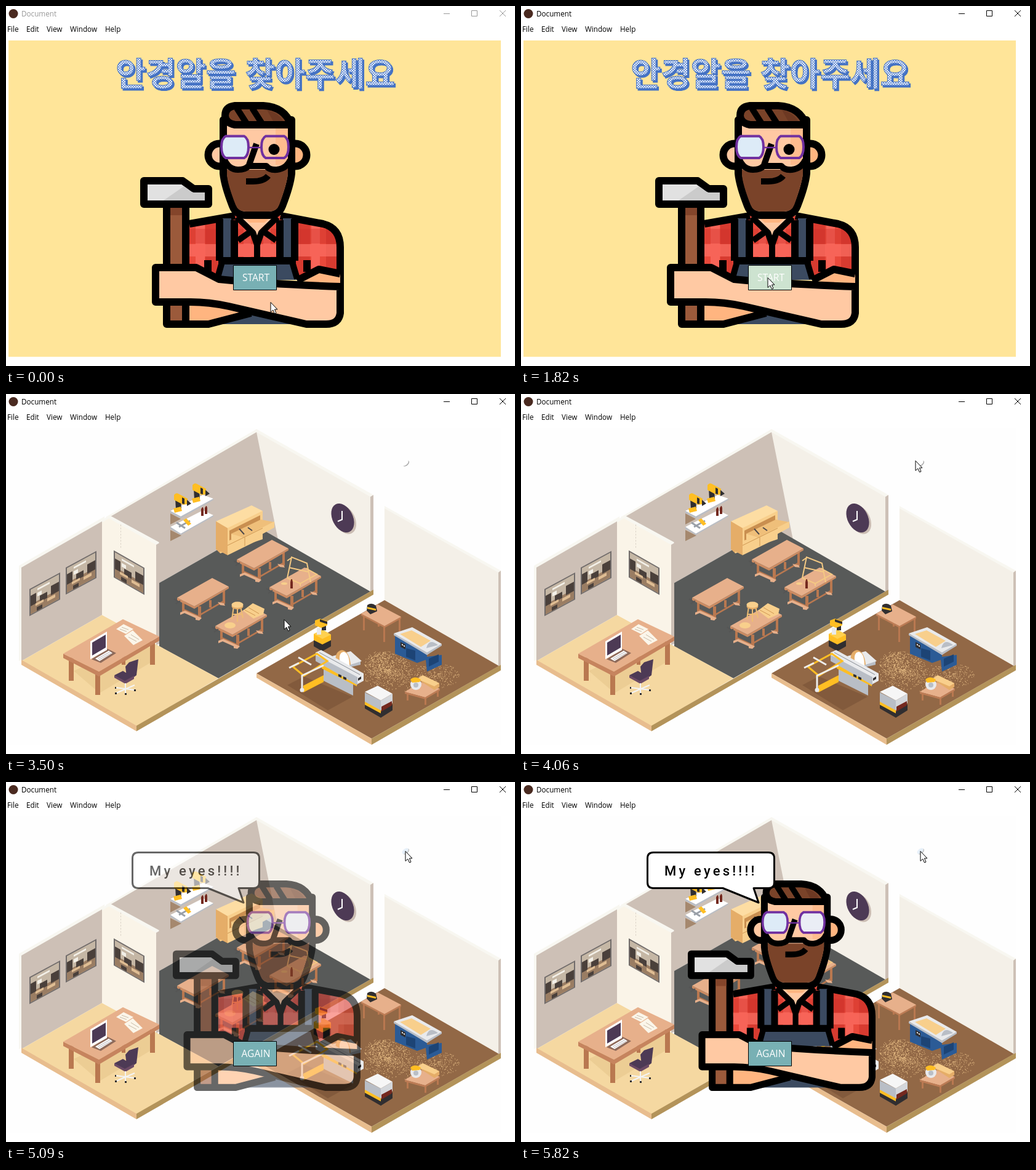
Recreate the animation shown at these times as an HTML page. Size 827 by 585 pixels, loop 5890 ms.

```html
<!DOCTYPE html>
<html lang="ko">
<head>
<meta charset="utf-8">
<title>Document</title>
<style>
html, body { margin: 0; width: 100%; height: 100%; overflow: hidden; background: #fff }
svg { display: block; width: 827px; height: 585px }
.ui { font: 11.7px "Open Sans", "Noto Sans", sans-serif }
.title { font: bold 53px "Noto Sans CJK KR", "Noto Sans CJK", "Noto Sans CJK JP", sans-serif }
.label { font: 15.6px "Open Sans", "Noto Sans", sans-serif; fill: #fff; text-anchor: middle }
.shout { font: 500 22px Roboto, sans-serif; letter-spacing: 4.2px }
.line { fill: none; stroke: #000; stroke-width: 12; stroke-linejoin: round }
.mid { stroke-width: 10 }
.thin { fill: none; stroke-width: 2 } .hairline { stroke-width: 1 } .bar { stroke-width: 3 }
.shade { fill: #cdc0b6 } .wall { fill: #f4f0e8 } .rim { fill: #f8f7f1 }
.lip { fill: #e8bd8e } .gold { fill: #b3935a }
.top { fill: #e7b08b } .leg { fill: #b97850 } .pine { fill: #f8cf8c } .oak { fill: #e5ad68 }
.yel { fill: #ffbe23 } .dark { fill: #302e30 } .pale { fill: #e9eaec } .steel { fill: #b9bec6 }
.plum { fill: #4d3a55 } .blue { fill: #2b5b96 } .wine { fill: #74291f }
.navy { fill: #3b4a60 } .skin { fill: #ffc9a3 } .tan { fill: #ffb580 } .hair { fill: #7a4329 }
</style>
</head>
<body>
<svg viewBox="0 0 827 585">
<defs>
  <pattern id="dots" width="4" height="4" patternUnits="userSpaceOnUse">
    <rect width="4" height="4" fill="#e6edf8"/>
    <path d="M0 0h2v2h-2zM2 2h2v2h-2z" fill="#6f94d6"/>
  </pattern>
  <clipPath id="torso"><path d="M298 354L372 341H446L515 354Q542 361 543 392V440H298Z"/></clipPath>

  <path id="lens" d="M357 211.500H387Q394 215 394 229Q394 243 387 247H357Q350 243 350 229Q350 215 357 211.500Z"/>
  <g id="specs" fill="none" stroke="#7030a0" stroke-width="4">
    <use href="#lens"/><use href="#lens" x="65"/>
    <path d="M394 230H415" stroke-width="2.500"/>
  </g>

  <g id="man">
    <path class="navy" d="M345 517L396 500L466 517Z"/>
    <g clip-path="url(#torso)">
      <path fill="#e9493b" d="M290 335H550V445H290Z"/>
      <path fill="#d83b30" d="M324 335h20v110h-20zM470 335h24v110h-24zM520 335h24v110h-24z"/>
      <path fill="#ff7468" opacity=".65" d="M308 335h15v110h-15zM386 335h12v110h-12zM418 335h12v110h-12zM496 335h14v110h-14zM290 387h260v20h-260z"/>
      <path fill="#c9302a" opacity=".35" d="M290 362h260v24h-260z"/>
    </g>
    <path class="skin" d="M380 342H436L414 362L408 380L400 362Z"/>
    <path class="tan" d="M384 341H432L420 352H396Z"/>
    <path class="line" d="M298 354L372 341M446 341L515 354Q543 361 543 392V460"/>
    <path class="line mid" d="M375 343L401 368L408 388L415 368L441 343M377 381L401 364M439 381L415 364M408 382V414"/>
    <path class="navy" d="M352 345h14v72h-14zM450 345h14v72h-14zM352 418H464L473 445H343Z"/>
    <path class="line" d="M347 346V414M371 348V414M445 348V414M469 346V414M328 413V432M489 413V432M345 414H471"/>
    <path class="line mid" d="M351 416L344 441M465 416L473 443"/>

    <g class="line">
      <circle class="skin" cx="347" cy="242" r="18.500"/><circle class="tan" cx="470" cy="242" r="18.500"/>
      <path class="skin" d="M353 185V272Q355 292 368 325Q374 340 389 340H428Q443 340 449 325Q462 292 464 272V185Z"/>
    </g>
    <path class="tan" opacity=".6" d="M438 195H458V258H438Z"/>
    <path class="hair" d="M359 265Q371 274 389 266H427Q445 274 458 262V274Q456 290 444 323Q440 334 428 334H389Q377 334 373 323Q360 290 359 274Z"/>
    <path class="line mid" d="M355 250Q362 266 377 266Q389 266 394 260H423Q428 267 440 266Q456 264 462 250"/>
    <path class="line mid" d="M390 285H401Q419 285 426 276"/>
    <path class="line mid" d="M407 224L395 258"/>
    <circle cx="435.500" cy="233" r="9"/>
    <path class="line" style="fill:#7a4329" d="M372 162H418Q453 164 463 193H372Q356 190 356 178Q356 164 372 162Z"/>
    <path class="line mid" d="M375 166L391 191M400 166L416 191"/>
    <path fill="#64341f" opacity=".6" d="M424 169Q442 173 450 187H434Z"/>
    <use href="#lens" fill="#ddebf7"/>

    <path class="tan" d="M292 480L350 487L395 501L330 517H292ZM478 446L508 430L543 436V457Z"/>
    <path class="line" d="M261 517H329L398 499M473 446L508 428L543 435"/>
    <path class="line" style="fill:#9b5a3b" d="M261 320H292V517H261Z"/>
    <path fill="#84452b" d="M267 327h19v13h-19z"/>
    <path class="line" style="fill:#e1e1e1" d="M224 284H287L305 297H329V322H224Z"/>
    <path fill="#cbcbcb" d="M256 316L289 293L303 303H323V316Z"/>
    <path class="line" style="fill:#ffc9a3" d="M243 425H309L346 444Q430 452 543 456V499Q541 517 520 517H488L362 488Q330 481 300 481H243Z"/>
  </g>

  <g id="bench">
    <path class="leg" d="M8 3h4v21h-4zM34 14h5v20h-5zM52 4h4v12h-4zM74 -11h4v21h-4zM9 17L37 30V33L9 20ZM38 26L76 4V7L38 29Z"/>
    <path class="top" d="M5 24L13 21L40 33L36 37L30 36V33L12 25L5 28ZM66 7L76 9L78 13L70 12Z"/>
    <path fill="#cb8b62" d="M0 0L28 14L84 -18V-15L28 18L0 4Z"/>
    <path class="top" d="M0 0L57 -32L84 -18L28 14Z"/>
    <path class="thin" stroke="#555" d="M-5 2L4 8M-2 10L5 5"/>
  </g>
  <g id="photo">
    <path fill="#716c6b" d="M0 0h50v44h-50z"/><path fill="#c5b7a5" d="M2 2h46v40h-46z"/>
    <path fill="#9a7d63" d="M2 26h46v16h-46z"/><path fill="#4a403b" d="M2 12h9v17h-9zM17 20h12v10h-12zM35 14h13v15h-13zM12 36h9v6h-9z"/>
    <path fill="#dfbd93" d="M10 29h13v4h-13zM29 31h13v5h-13z"/><path fill="#f3f0e8" d="M13 6h20v3h-20zM13 13h7v6h-7z"/>
  </g>
  <g id="drill">
    <path class="dark" d="M2 9L11 13L12 25L3 26Z"/><path class="yel" d="M0 3Q3 -1 7 1L22 9V18L15 19L0 11ZM-1 25L11 22L13 29L1 32Z"/>
    <path class="dark" d="M13 7L17 9V18L13 17ZM21 11L28 17L21 21Z"/>
  </g>
</defs>

<g class="ui" id="bar">
  <circle cx="12" cy="12.500" r="7.500" fill="#4a2a20"/>
  <text x="25" y="17" fill="currentColor">Document</text>
  <path stroke="currentColor" fill="none" d="M711 12.500h10M756.500 7.500h9v9h-9zM802 7l10 10M812 7l-10 10"/>
</g>
<g class="ui"><text x="2" y="42">File</text><text x="33" y="42">Edit</text><text x="66" y="42">View</text><text x="104" y="42">Window</text><text x="161" y="42">Help</text></g>

<g id="intro">
  <path fill="#ffe599" d="M4 56h800v514h-800z"/>
  <g class="title">
    <text x="181" y="132.500" fill="#4472c4" stroke="#4472c4">안경알을 찾아주세요</text>
    <text x="178.500" y="130" fill="url(#dots)" stroke="#4472c4">안경알을 찾아주세요</text>
  </g>
  <use href="#man"/><use href="#specs"/>
</g>

<g id="room">
  <path fill="#fefefe" d="M4 56h800v514h-800z"/>
  <!-- main hall and office -->
  <path class="rim" d="M162 200L407 57L597 164L592 168L407 63L170 202ZM21 279L160 199V208L25 284V432L21 434Z"/>
  <path class="wall" d="M407 62L592 167V322L409 216Z"/>
  <path class="shade" d="M170 199L407 62L442 237L409 216L249 307V242ZM592 167L597 164V320L592 322Z"/>
  <path class="shade" d="M25 282L156 207V359L25 434Z"/>
  <path fill="#585a59" d="M249 307L409 216L592 321L345 462L249 410Z"/>
  <path fill="#f5d8a1" d="M25 434L156 359L345 462L212 540Z"/>
  <path class="lip" d="M25 432L212 539V548L25 440Z"/>
  <path class="gold" d="M212 539L597 318V326L212 548Z"/>
  <path fill="#faf4e8" d="M156 207L167 200L246 245V408L156 359Z"/>
  <path class="rim" d="M156 205L168 197L249 241L244 245L167 202L156 209Z"/>
  <path class="shade" d="M244 245L249 242V406L244 408Z"/>
  <path stroke="#ddd5ca" stroke-dasharray="3 2" d="M186.500 212V252"/>
  <use href="#photo" transform="matrix(1 -.54 0 1 38 317)"/>
  <use href="#photo" transform="matrix(1 -.54 0 1 97 282)"/>
  <use href="#photo" transform="matrix(1 .57 0 1 175 254)"/>

  <!-- shelves -->
  <path fill="#a5886e" d="M267 194L284 203L267 212ZM267 221L285 230L267 239Z"/>
  <path fill="#fff" d="M267 190L320 164L337 170L284 199ZM267 216L320 189L337 197L284 227Z"/>
  <path class="steel" d="M267 190L284 199L337 170V172L284 202L267 193ZM267 216L284 227L337 197V199L284 229L267 219Z"/>
  <use href="#drill" x="273" y="161"/><use href="#drill" x="303" y="145"/>
  <path class="wine" d="M317 187l2-3h1l1 3v11h-4zM323 185l2-3h1l1 3v10h-4z"/>
  <path class="thin bar" stroke="#9aa0a8" d="M277 209L291 218M281 216L299 206"/>
  <path class="yel" d="M288 205L293 202L301 211L296 214Z"/>

  <!-- clock -->
  <ellipse cx="550.500" cy="204" rx="16.500" ry="25" transform="rotate(-27 550.500 204)" fill="#cbbdb3"/>
  <ellipse class="plum" cx="547" cy="201.500" rx="16.500" ry="25" transform="rotate(-27 547 201.500)"/>
  <path class="thin" stroke="#fff" d="M546 190V204L539 207"/>

  <!-- cabinet -->
  <path class="oak" d="M341 207L348 211V259L341 252Z"/>
  <path class="pine" d="M348 211L417 190V236L348 259Z"/>
  <path fill="#fddda3" d="M341 207L399 181L417 190L360 218Z"/>
  <path class="oak" d="M341 207L360 218V262L341 252Z"/>
  <path class="pine" d="M360 218L417 190V234L360 262Z"/>
  <path fill="#c98f50" d="M363 222L413 197V214L363 238Z"/>
  <path fill="#efbf7a" d="M366 227L414 204L435 208L385 235Z"/>
  <path class="pine" d="M385 233L436 207V217L388 243L366 236V227Z"/>
  <path class="thin hairline" stroke="#cf9752" d="M360 246L417 218M388 233V247"/>
  <path class="thin" stroke="#4f4a4a" d="M379 219L387 228M393 217L400 222"/>

  <use href="#bench" x="375" y="269"/><use href="#bench" x="428" y="314"/>
  <use href="#bench" x="278" y="331"/><use href="#bench" x="340" y="377"/>
  <path class="thin" stroke="#f4c983" d="M457 299L464 265L489 275L495 306M460 282L491 289M457 299L478 308L505 293L487 283M478 308V312M464 266L457 271"/>
  <path class="wine" d="M462 316V306L463 301H465L466 306V316Z"/>
  <ellipse cx="452" cy="308" rx="5" ry="2" class="pine"/>
  <path class="thin" stroke="#efbd74" d="M370 345L367 366M381 345L385 364M376 347V370M369 358H384"/>
  <ellipse class="oak" cx="376" cy="345" rx="9.500" ry="5"/><ellipse class="pine" cx="376" cy="342.500" rx="9.500" ry="5"/>
  <ellipse class="pine" cx="364" cy="376" rx="9" ry="5"/>
  <path class="pine" d="M385 352L401 340L420 349L418 358L402 365Z"/><path class="thin hairline" stroke="#cf9752" d="M388 351L405 360M394 347L411 357"/>

  <!-- office desk -->
  <path fill="#d9b77d" d="M110 450L175 420L234 412V437L152 486Z" opacity=".35"/>
  <path class="leg" d="M102 428h8v38h-8zM145 451h8v38h-8zM234 402h8v38h-8zM188 420h6v20h-6z"/>
  <path fill="#c6845e" d="M93 422L151 451L249 394V401L151 459L93 429Z"/>
  <path class="top" d="M93 422L190 366L249 394L151 451Z"/>
  <path fill="#fbf6ea" d="M179 382L191 374L207 382L195 390ZM192 393L206 384L222 400L207 408Z"/>
  <path class="thin hairline" stroke="#c9bba8" d="M185 382L196 386M188 379L199 383M199 395L212 402M203 391L216 399"/>
  <path fill="#8e6a5a" d="M139 431L165 414L179 421L154 437Z"/>
  <path fill="#fff" d="M137 402L164 386V416L137 431Z"/><path class="plum" d="M140 404L162 391V412L140 425Z"/>
  <path fill="#fff" d="M145 430L167 417L173 421L152 434Z"/><path class="thin hairline" stroke="#b5b1b5" d="M149 430L169 419M151 432L171 421"/>
  <path class="plum" d="M194 443L200 436L215 431L212 457L197 468ZM176 457L190 450L208 461L193 469Z"/>
  <path fill="#6b4a65" d="M176 457L193 466L208 458V463L194 471L176 461Z"/>
  <path class="thin" stroke="#f4f4f4" d="M194 470V478M178 477L209 481M179 486L209 473M194 477V487"/>
  <path class="dark" d="M177 485h3v3h-3zM193 486h3v3h-3zM208 480h3v3h-3zM177 476h2v3h-2z"/>

  <!-- machine shop -->
  <path class="rim" d="M615 182L804 287L800 291L615 187Z"/>
  <path class="wall" d="M615 186L800 290V443L615 336Z"/>
  <path class="shade" d="M800 290L804 287V440L800 442Z"/>
  <path fill="#926846" d="M615 335L801 442L594 560L407 454Z"/>
  <path class="lip" d="M407 454L594 560V570L407 461Z"/>
  <path class="gold" d="M594 560L804 440V449L594 570Z"/>
  <path fill="#795236" opacity=".6" d="M457 473L484 459L563 492L523 514Z"/>
  <path id="dust" stroke="#e9bf86" stroke-width="1"/>

  <path class="leg" d="M580 358h3v26h-3zM613 374h3v29h-3zM638 362h3v27h-3zM604 365h3v13h-3z"/>
  <path fill="#bd7c55" d="M577 357L615 377L642 362V365L615 380L577 360Z"/>
  <path class="top" d="M577 357L604 342L642 362L615 377Z"/>
  <path class="dark" d="M587 343Q594 338 601 344L603 353L592 358L586 352Z"/><path class="yel" d="M587 346L601 349V352L587 349Z"/>

  <path class="dark" d="M500 390L514 398L528 391V410L514 418L500 410Z"/>
  <path class="yel" d="M500 390L514 383L528 391V400L514 407L500 400Z"/><path fill="#ffd150" d="M500 390L514 383L528 391L514 398Z"/>
  <path class="pale" d="M505 380h7v11h-7z"/><path class="dark" d="M513 373h7v11h-7z"/>
  <path class="yel" d="M502 368L510 365L522 369V376L512 380L502 376Z"/><path class="dark" d="M510 366L522 370V374L510 370Z"/>

  <path class="steel" d="M534 425L576 433V440L545 447Z"/><path class="pale" d="M530 426L560 418L578 434L550 443Z"/>
  <path class="oak" d="M536 438Q533 418 546 416Q558 418 560 440Z"/><path fill="#fff" d="M543 438Q539 420 549 419Q558 421 558 442Z"/>
  <path class="yel" d="M483 474L516 457V468L483 485Z"/>
  <path class="steel" d="M516 443L564 469V490L516 466Z"/>
  <path class="yel" d="M513 438L570 467V475L513 446Z"/>
  <path class="pale" d="M503 420L512 416L581 454V466L570 472L503 431Z"/>
  <path class="steel" d="M503 424L571 460V473L503 434Z"/><path class="thin hairline" stroke="#868c94" d="M509 420L575 456"/>
  <path class="dark" d="M540 455l5 2v4l-5-2zM548 459l5 2v4l-5-2zM572 462l5-3v4l-5 3z"/>
  <path class="thin bar" stroke="#ffbe23" d="M466 443L505 422L522 434L484 458Z"/>
  <path class="thin bar" stroke="#eeeeec" d="M460 445L476 437M475 428L496 440M481 457V484M480 458L516 441"/>
  <circle class="pale" cx="481" cy="481" r="3.500"/>

  <path class="blue" d="M632 393L684 421V427L708 424V440L684 451L682 432L668 437L632 422Z"/>
  <path fill="#1d4475" d="M650 413L665 417V433L650 427ZM687 430L703 423V435L687 443Z"/>
  <path class="pale" d="M630 389L660 379L708 406L684 424Z"/><path class="steel" d="M630 389L684 420L708 406V409L684 424L630 392Z"/>
  <path class="pine" d="M640 390L659 384L690 401L674 411Z"/><path class="steel" d="M683 413Q687 396 702 408Z"/>
  <path class="dark" d="M641 403l8 4v8l-8-4z"/><path fill="#fff" d="M643 406l2 1v2l-2-1zM646 408l2 1v2l-2-1z"/>

  <path class="leg" d="M651 484h3v14h-3zM680 489h3v16h-3zM700 476h3v16h-3z"/>
  <path class="top" d="M648 484L674 468L705 479L681 493Z"/><path fill="#bd7c55" d="M648 484L681 493L705 479V482L681 496L648 487Z"/>
  <path class="oak" d="M668 463L677 457L704 470V476L696 481Z"/><path class="pine" d="M668 463L677 457L704 470L696 475Z"/>
  <circle class="pale" cx="666" cy="472" r="9"/><circle class="steel" cx="666" cy="473" r="4"/><path class="yel" d="M657 464Q664 457 674 464L672 468L660 469Z"/>

  <path class="dark" d="M583 501L609 516L628 504V514L609 526L583 511Z"/>
  <path class="steel" d="M583 485L609 498V515L583 501Z"/><path fill="#f6f6f6" d="M583 484L604 474L628 487L609 498Z"/>
  <path fill="#d4d7db" d="M609 498L628 487V502L609 514Z"/><path class="yel" d="M583 500L609 514V519L583 505Z"/>
  <path class="wine" d="M610 508L627 499V506L610 516Z"/>

  <g id="lost" transform="rotate(-40 649 112.500)"><ellipse cx="649.500" cy="113.500" rx="6" ry="3.500" fill="#aaa"/><ellipse id="glass" cx="649" cy="112" rx="6" ry="3.500"/></g>
  <g id="ending">
    <g transform="translate(271 160) scale(.9215 .932) translate(-218 -156)">
      <use href="#man"/><use href="#lens" x="65" fill="#eaedf5"/><use href="#specs"/>
    </g>
    <path fill="#fff" stroke="#000" stroke-width="3" stroke-linejoin="round" d="M215 114.500H402Q411.500 114.500 411.500 124V163Q411.500 172.500 402 172.500H378L386 196L328 172.500H215Q205.500 172.500 205.500 163V124Q205.500 114.500 215 114.500Z"/>
    <text class="shout" x="233" y="152">My eyes!!!!</text>
  </g>
</g>

<g id="button">
  <path id="face" stroke="#000" d="M369.500 421.500h70v40h-70z"/>
  <text id="word" class="label" x="406" y="447"></text>
</g>
<path id="cursor" fill="#fff" stroke="#000" d="M.5 .5V16.500L4.300 13L7 19L9.500 18L7 12H11.500Z"/>
</svg>

<script>
const LOOP = 5890;
const el = id => document.getElementById(id);
const show = (id, on) => el(id).style.display = on ? '' : 'none';
const mix = (a, b, p) => a + (b - a) * p;

// Share of a move done at time t, in n even jumps from a to b.
const jumps = (t, a, b, n) =>
  t < a ? 0 : Math.min(1, (Math.floor((t - a) / (b - a) * (n - 1) + .001) + 1) / n);

// Sawdust: seeded specks, densest in the middle of each heap.
let seed = 7;
const rnd = () => (seed = seed * 16807 % 2147483647) / 2147483647;
const heap = (x, y, rx, ry, n) => Array.from({length: n}, () => {
  const a = rnd() * 2 * Math.PI, r = rnd() ** .7;
  return `M${(x + rx * r * Math.cos(a)).toFixed(1)} ${(y + ry * r * Math.sin(a)).toFixed(1)}h1`;
}).join('');
el('dust').setAttribute('d', heap(618, 450, 40, 32, 560) + heap(606, 440, 24, 22, 240) +
  heap(702, 458, 36, 20, 220) + heap(660, 462, 42, 22, 160) + heap(612, 364, 14, 8, 40));

// start, end, jumps, x, y
const moves = [
  [660, 1210, 9, 386, 429],
  [1700, 1820, 2, 401, 441],
  [3390, 3920, 9, 632, 103],
  [3990, 4200, 4, 649, 112]
];
const fadeTimes = [4830, 4960, 5090, 5290, 5430, 5560, 5690, 5820];

function draw(t) {
  const room = t >= 2730, again = t >= 4830;
  el('bar').style.color = t < 1270 ? '#999' : '#000';
  show('intro', !room);
  show('room', room);
  show('button', !room || again);
  el('word').textContent = again ? 'AGAIN' : 'START';

  const hover = again ? 0 : jumps(t, 900, 1470, 9);
  const from = [120, 176, 180], to = [205, 227, 208];
  el('face').setAttribute('fill', `rgb(${from.map((c, i) => Math.round(mix(c, to[i], hover)))})`);

  el('glass').setAttribute('fill', t < 4410 ? '#fff' : t < 4620 ? '#eef4fb' : '#ddebf7');
  el('lost').style.opacity = t < 4620 ? 1 : .7;

  const seen = fadeTimes.filter(s => s <= t).pop() || 4830;
  el('ending').style.opacity = 1 - (1 - (seen - 4830) / 990) ** 3;

  let x = 430, y = 481;
  for (const [a, b, n, tx, ty] of moves) {
    const p = jumps(t, a, b, n);
    x = mix(x, tx, p);
    y = mix(y, ty, p);
  }
  el('cursor').setAttribute('transform', `translate(${Math.round(x) - .5} ${Math.round(y)})`);
}

const start = performance.now();
(function tick() {
  draw((performance.now() - start) % LOOP);
  requestAnimationFrame(tick);
})();
</script>
</body>
</html>
```
